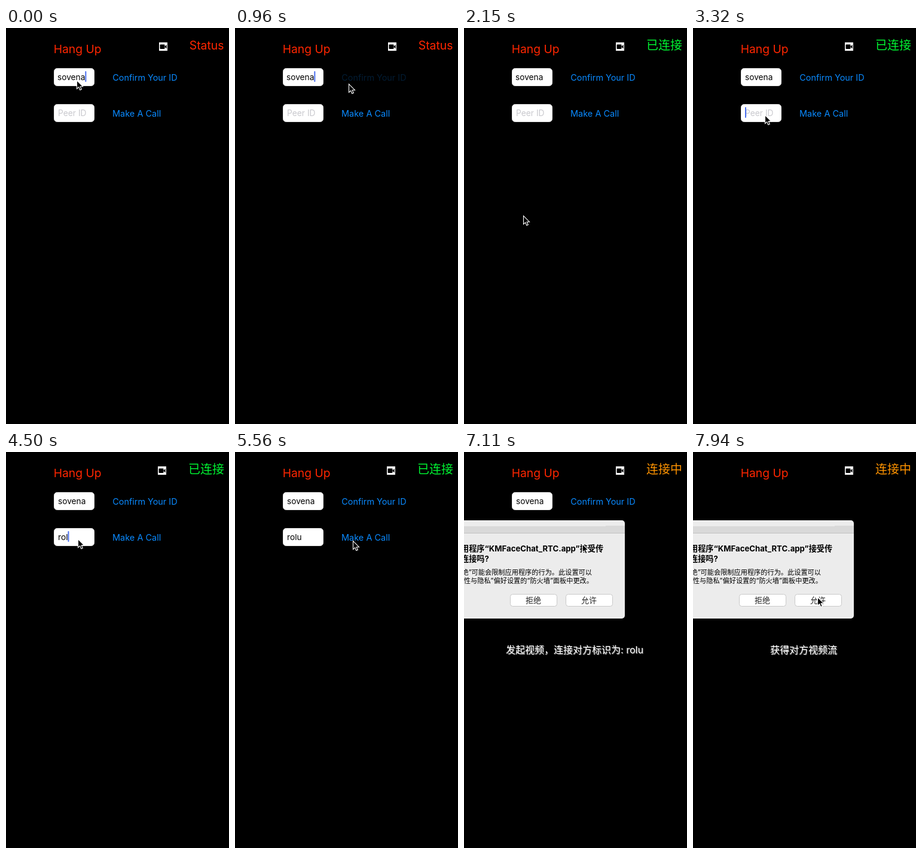
An HTML page with a canvas for the animation above (8 s loop, 373 px wide and 661 px high).

```html
<!DOCTYPE html>
<html lang="zh-CN">
<head>
<meta charset="utf-8">
<title>Video call</title>
<style>
html, body { margin: 0; width: 100%; height: 100%; overflow: hidden; background: #000; }
canvas { display: block; width: 373px; height: 661px; }
</style>
</head>
<body>
<canvas id="stage"></canvas>
<script>
const W = 373, H = 661, LOOP = 8000, TICK = 118.5;
const canvas = document.getElementById('stage');
const ctx = canvas.getContext('2d');
const dpr = window.devicePixelRatio || 1;
canvas.width = W * dpr;
canvas.height = H * dpr;

const FAMILY = 'Inter, "Noto Sans CJK SC", "Noto Sans CJK", sans-serif';
const RED = '#ff2600', GREEN = '#00f532', ORANGE = '#ff9300', BLUE = '#0a8aff';
const MY_ID = 'sovena', PEER_ID = 'rolu';

// Pointer tip: [tick, x, y]
const PATH = [
  [0, 118.5, 87.5], [5, 190.5, 86], [7, 190.5, 86], [8, 190.5, 93.5],
  [14, 99.5, 313.5], [18, 99.5, 313.5], [22, 182, 130], [26, 120.5, 145.5],
  [43, 120.5, 145.5], [47, 197.5, 148.5], [59, 197.5, 148.5], [66, 208.5, 242.5]
];
const ARROW = [[0, 0], [0, 14], [3.2, 11.2], [5.3, 16], [7.8, 15], [5.7, 10.2], [10, 10.2]];

// Toasts: [text, first tick, end tick]
const TOASTS = [
  ['连接服务器成功，您的标识为:' + MY_ID, 11, 18],
  ['发起视频，连接对方标识为: ' + PEER_ID, 53, 62],
  ['获得对方视频流', 62, 99]
];

const within = (n, a, b) => n >= a && n < b;

function text(str, x, y, size, color, { align = 'left', weight = 400 } = {}) {
  ctx.font = `${weight} ${size}px ${FAMILY}`;
  ctx.textAlign = align;
  ctx.fillStyle = color;
  ctx.fillText(str, x, y);
  return ctx.measureText(str).width;
}

function box(x, y, w, h, r, fill, stroke) {
  ctx.beginPath();
  ctx.roundRect(x, y, w, h, r);
  ctx.fillStyle = fill;
  ctx.fill();
  if (stroke) {
    ctx.strokeStyle = stroke;
    ctx.lineWidth = 1;
    ctx.stroke();
  }
}

function fade(alpha, draw) {
  ctx.save();
  ctx.globalAlpha = alpha;
  draw();
  ctx.restore();
}

function polygon(points) {
  ctx.beginPath();
  points.forEach(([x, y]) => ctx.lineTo(x, y));
  ctx.closePath();
}

function field(y, value, hint, x, caret) {
  box(80.5, y + .5, 67, 29, 5, '#fff', '#e4e4e4');
  const w = value ? text(value, x, y + 20, 13.7, '#000') : 0;
  if (!value) text(hint, 87, y + 20, 13.8, '#c9c9ce');
  if (caret) fade(caret, () => box(x + w, y + 5, 2, 18, 1, '#4a70f0'));
}

function camera(x, y) {
  ctx.fillStyle = '#fff';
  ctx.fillRect(x, y, 14, 14);
  box(x + 1.5, y + 3.5, 8, 7.5, 1, '#000');
  polygon([[x + 9, y + 7.2], [x + 12.7, y + 4], [x + 12.7, y + 10.6]]);
  ctx.fill();
}

function header(n) {
  text('Hang Up', 79.7, 42, 19.3, RED);
  camera(n < 11 ? 256 : 254, 24);
  if (n < 11) text('Status', 364.5, 36, 19.4, RED, { align: 'right' });
  else if (n < 53) text('已连接', 305, 36, 20, GREEN);
  else text('连接中', 305, 36, 20, ORANGE);
}

function ownCaret(n) {
  return within(n, 0, 2) || within(n, 5, 16) || within(n, 20, 24) ? 1 : 0;
}

function peerCaret(n) {
  if (n === 31) return .5;
  return within(n, 28, 31) || within(n, 35, 44) || within(n, 48, 52) ? 1 : 0;
}

// Pressed buttons dim, then recover over a few ticks.
function pressAlpha(n, down, up, end) {
  if (!within(n, down, end)) return 1;
  return n < up ? .2 : .2 + .8 * (n - up + 1) / (end - up + 1);
}

function form(n) {
  const typed = n < 35 ? 0 : n < 38 ? 1 : n < 39 ? 3 : 4;
  field(67, MY_ID, '', n < 28 ? 86 : 87, ownCaret(n));
  field(127, PEER_ID.slice(0, typed), 'Peer ID', 87, peerCaret(n));
  fade(pressAlpha(n, 6, 9, 11), () => text('Confirm Your ID', 178.3, 87.5, 14.4, BLUE));
  fade(pressAlpha(n, 51, 53, 55), () => text('Make A Call', 178, 147.5, 14.5, BLUE));
}

function toast(n) {
  for (const [str, from, to] of TOASTS) {
    if (!within(n, from, to)) continue;
    fade(n === from || n === to - 1 ? .5 : 1, () => {
      text(str, 186, 337, 16, '#777', { align: 'center' });
      text(str, 185, 336, 16, '#fff', { align: 'center' });
    });
  }
}

function dialogButton(x, label) {
  box(x + .5, 237.5, 78, 20, 4, '#fff', '#c9c9c9');
  text(label, x + 39, 252, 13, '#222', { align: 'center' });
}

function dialog() {
  ctx.save();
  ctx.beginPath();
  ctx.roundRect(-20, 114, 289, 164, 5);
  ctx.clip();
  ctx.fillStyle = '#ececec';
  ctx.fillRect(0, 114, 269, 164);
  ctx.fillStyle = '#d9d9d9';
  ctx.fillRect(0, 124, 269, 11);
  ctx.fillRect(237, 123, 32, 1);
  ctx.fillStyle = '#c2c2c2';
  ctx.fillRect(0, 135, 269, 1);
  ctx.restore();
  const bold = { weight: 700 }, right = { align: 'right' };
  text('用程序“KMFaceChat_RTC.app”接受传', -5, 166, 13.2, '#000', bold);
  text('连接吗?', -5, 183, 13.2, '#000', bold);
  text('绝”可能会限制应用程序的行为。此设置可以', 214, 205, 11.2, '#000', right);
  text('性与隐私”偏好设置的“防火墙”面板中更改。', 216, 219, 11.2, '#000', right);
  dialogButton(77, '拒绝');
  dialogButton(170, '允许');
}

function pointerAt(n) {
  let i = 0;
  while (i < PATH.length - 1 && PATH[i + 1][0] <= n) i++;
  const a = PATH[i], b = PATH[i + 1] || a;
  const k = b === a ? 0 : (n - a[0]) / (b[0] - a[0]);
  const e = k * k * (3 - 2 * k);
  return [a[1] + (b[1] - a[1]) * e, a[2] + (b[2] - a[2]) * e];
}

function pointer(n) {
  ctx.save();
  ctx.translate(...pointerAt(n));
  polygon(ARROW);
  ctx.fillStyle = '#000';
  ctx.fill();
  ctx.strokeStyle = '#fff';
  ctx.lineWidth = 1.1;
  ctx.stroke();
  ctx.restore();
}

function draw(ms) {
  const n = Math.floor(ms / TICK + .2);
  ctx.setTransform(dpr, 0, 0, dpr, 0, 0);
  ctx.fillStyle = '#000';
  ctx.fillRect(0, 0, W, H);
  header(n);
  if (n < 62) form(n);
  toast(n);
  if (n >= 56) dialog();
  pointer(n);
}

const start = performance.now();
function loop() {
  draw((performance.now() - start) % LOOP);
  requestAnimationFrame(loop);
}
loop();
</script>
</body>
</html>
```
